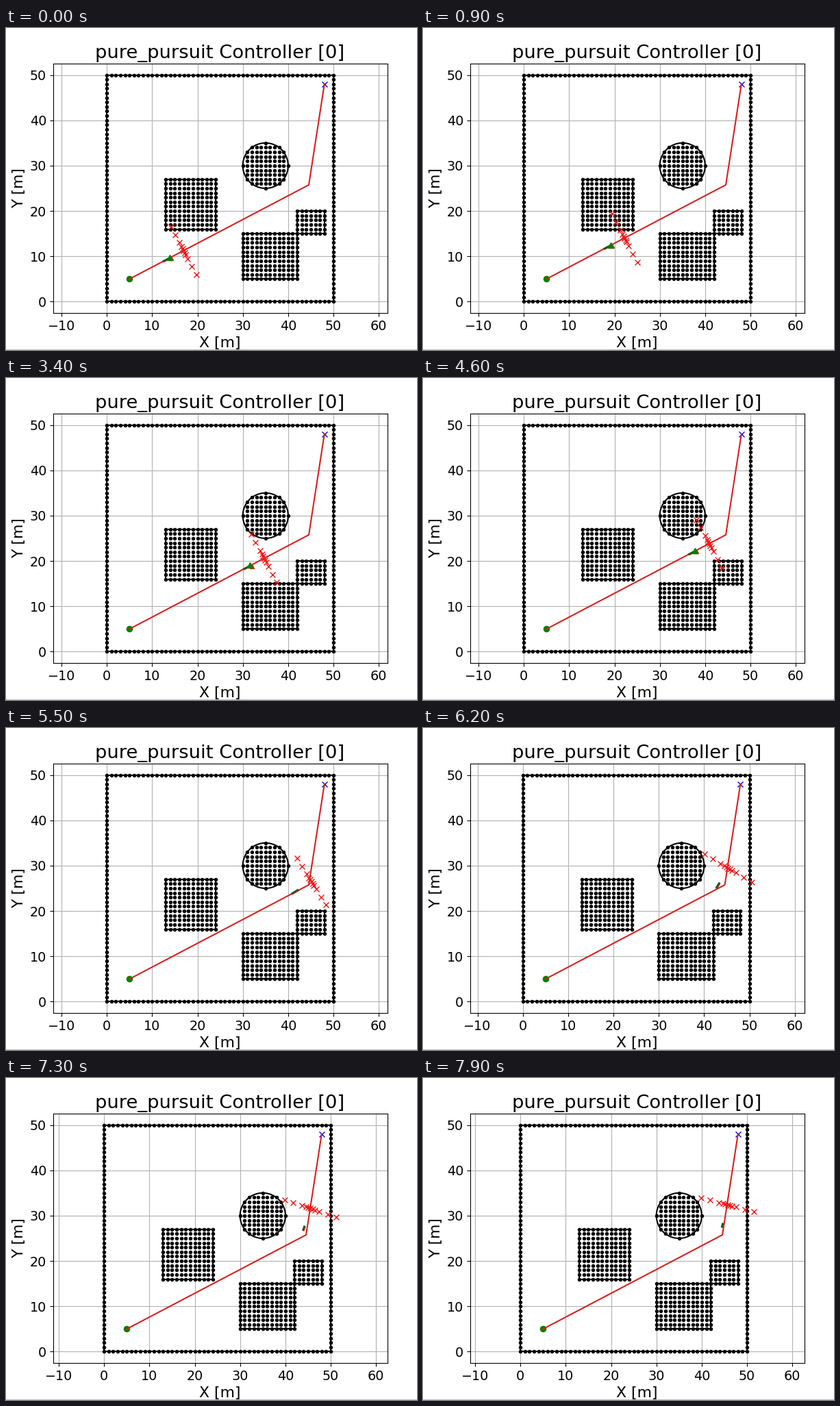
A matplotlib script for the animation above (8000 ms loop, 600 by 470 pixels).

```python
import numpy as np
import matplotlib.pyplot as plt
from matplotlib.animation import FuncAnimation
from matplotlib.lines import Line2D
from matplotlib.ticker import MultipleLocator

W, H, DPI = 600, 470, 100
S = 0.984  # screen scale of all point sizes
FRAMES, STEP = 80, 100
AX_W, AX_H = 488, 364
HALF_SPAN = 55 * AX_W / AX_H / 2

START, CORNER, GOAL = (5, 5), (44.56, 25.76), (48, 48)
LOOK = 5.0
OFFSETS = np.array([-6, -4, -2, -1, -0.5, 0, 0.5, 1, 2, 4, 6])
TURN = 5.5

# vehicle pose at a few times (s)
T = [0, 0.9, 2.3, 4.6, 5.4, 6.2, 6.8, 7.9]
PX = [12.49, 17.78, 24.6, 36.45, 40.6, 42.72, 43.48, 44.44]
PY = [5 + (x - 5) * 0.5248 for x in PX[:5]] + [25.17, 26.26, 27.56]
HEADING = [27.7] * 5 + [59, 67.8, 75.4]
LENGTH = [1.5] * 5 + [1.1, 0.9, 0.65]

plt.rcParams.update({"font.family": "DejaVu Sans", "lines.linewidth": 1.5 * S,
                     "lines.markersize": 6 * S, "lines.markeredgewidth": S})
fig = plt.figure(figsize=(W / DPI, H / DPI), dpi=DPI, facecolor="white")
ax = fig.add_axes([68.6 / W, 54 / H, AX_W / W, AX_H / H])
fig.add_artist(Line2D([0, 1], [1.5 / H] * 2, color="#c4c4c4", lw=0.9, zorder=-1))

ax.set_ylim(-2.5, 52.5)
for axis in (ax.xaxis, ax.yaxis):
    axis.set_major_locator(MultipleLocator(10))
ax.tick_params(labelsize=14 * S, length=3.5 * S, width=0.8 * S, pad=3.5 * S)
ax.grid(True, color="#b0b0b0", lw=0.8 * S)
for spine in ax.spines.values():
    spine.set_linewidth(0.8 * S)
ax.set_title("pure_pursuit Controller [0]", fontsize=20 * S, pad=6 * S)
ax.set_xlabel("X [m]", fontsize=16 * S, labelpad=4 * S)
ax.set_ylabel("Y [m]", fontsize=16 * S, labelpad=4 * S)


def draw_box(x0, y0, x1, y1, filled=True):
    gx, gy = np.meshgrid(np.arange(x0, x1 + 1), np.arange(y0, y1 + 1))
    edge = (gx == x0) | (gx == x1) | (gy == y0) | (gy == y1)
    keep = edge | filled
    ax.plot(gx[keep], gy[keep], ".k")
    ax.plot([x0, x1, x1, x0, x0], [y0, y0, y1, y1, y0], "k")


def draw_disc(cx, cy, r):
    gx, gy = np.meshgrid(np.arange(-r, r + 1), np.arange(-r, r + 1))
    keep = gx**2 + gy**2 <= r * r
    ax.plot(cx + gx[keep], cy + gy[keep], ".k")
    a = np.linspace(0, 2 * np.pi, 121)
    ax.plot(cx + r * np.cos(a), cy + r * np.sin(a), "k")


draw_box(0, 0, 50, 50, filled=False)
draw_box(13, 16, 24, 27)
draw_box(30, 5, 42, 15)
draw_box(42, 15, 48, 20)
draw_disc(35, 30, 5)

ax.plot(*START, "og")
ax.plot(*GOAL, "xb")
ax.plot(*zip(START, CORNER, GOAL), color="#dc1c1c")

probes, = ax.plot([], [], "x", color="#f21414")
shadow, = ax.plot([], [], color="#dc1c1c")
body, = ax.plot([], [], color="#1c5a1c", lw=2 * S)
red_tip, = ax.plot([], [], "^", color="#e81c1c", ms=5 * S)
green_tip, = ax.plot([], [], "^g", ms=5.5 * S)


def update(i):
    t = i * STEP / 1000
    x, y, deg, size = (np.interp(t, T, v) for v in (PX, PY, HEADING, LENGTH))
    c, s = np.cos(np.radians(deg)), np.sin(np.radians(deg))

    qx = x + LOOK * c + OFFSETS * s
    qy = y + LOOK * s - OFFSETS * c
    probes.set_data(qx, qy)

    body.set_data([x, x + size * c], [y, y + size * s])
    shadow.set_data([x + 0.15, x + 0.15 + size * c], [y - 0.1, y - 0.1 + size * s])
    tx, ty = x + 1.5 * c, y + 1.5 * s
    green_tip.set_data([tx], [ty + 0.1])
    red_tip.set_data([tx + 0.35], [ty - 0.1])
    for tip in (green_tip, red_tip):
        tip.set_visible(t < TURN)

    # the view stays centred on the widest extent
    mid = max(50, qx.max()) / 2
    ax.set_xlim(mid - HALF_SPAN, mid + HALF_SPAN)
    return probes, shadow, body, red_tip, green_tip


anim = FuncAnimation(fig, update, frames=FRAMES, interval=STEP,
                     repeat=True, repeat_delay=0, blit=False)
plt.show()
```
